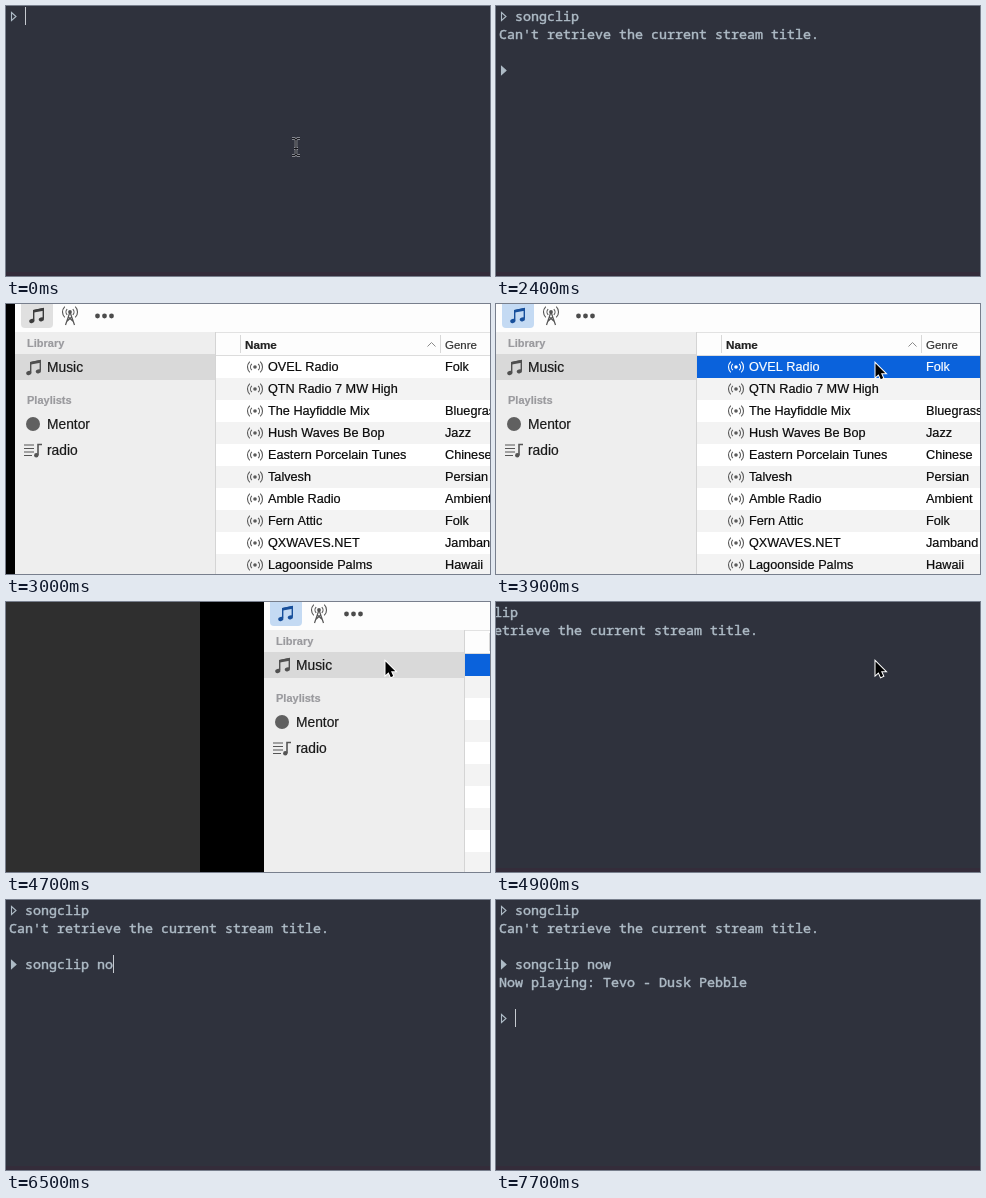
These frames come from a looping animation (484 by 270 pixels, 8 s). An HTML page with a canvas:

```html
<!DOCTYPE html>
<html lang="en">
<head>
<meta charset="utf-8">
<title>songclip demo</title>
<style>
html, body { margin: 0; height: 100%; overflow: hidden; background: #000; }
canvas { display: block; }
</style>
</head>
<body>
<canvas id="stage" width="484" height="270"></canvas>
<script>
const c = document.getElementById('stage').getContext('2d');
const LOOP = 8000, STEP = 100;
const PANE = 720, SCREEN = 1440, TRAVEL = 1504;   // terminal pane, whole space, space + gap
const MONO = '13.333px "Noto Sans Mono", "Liberation Mono", monospace';
const SANS = '"Liberation Sans", Arial, sans-serif';
const INK = '#aebbc6';

const stations = [
  ['OVEL Radio', 'Folk'], ['QTN Radio 7 MW High', ''], ['The Hayfiddle Mix', 'Bluegrass'],
  ['Hush Waves Be Bop', 'Jazz'], ['Eastern Porcelain Tunes', 'Chinese'], ['Talvesh', 'Persian'],
  ['Amble Radio', 'Ambient'], ['Fern Attic', 'Folk'], ['QXWAVES.NET', 'Jamband'],
  ['Lagoonside Palms', 'Hawaii']
];
// [time, characters typed]
const firstKeys = [[600, 1], [700, 3], [800, 5], [900, 6], [1100, 8]];
const secondKeys = [[5600, 3], [5700, 6], [5800, 8], [6300, 9], [6400, 10], [6500, 11], [6600, 12]];

const typed = (keys, t) => keys.reduce((n, [at, count]) => t >= at ? count : n, 0);

// Critically damped slide, 0 to 1
function glide(ms) {
  const x = Math.max(0, ms) * 0.0213;
  return 1 - (1 + x) * Math.exp(-x);
}

function rect(x, y, w, h, color) {
  c.fillStyle = color;
  c.fillRect(x, y, w, h);
}

// A thin outline of the same colour gives the heavier smoothing of the screen text
function text(str, x, y, font, color, weight = 0.2) {
  c.font = font;
  c.fillStyle = c.strokeStyle = color;
  c.lineWidth = weight;
  c.lineJoin = 'round';
  c.fillText(str, x, y);
  c.strokeText(str, x, y);
  c.lineJoin = 'miter';
}

function stroke(path, color, width = 1) {
  c.strokeStyle = color;
  c.lineWidth = width;
  c.stroke(new Path2D(path));
}

function at(x, y, draw) {
  c.save();
  c.translate(x, y);
  draw();
  c.restore();
}

function disc(x, y, r, color) {
  c.fillStyle = color;
  c.beginPath();
  c.arc(x, y, r, 0, 7);
  c.fill();
}

// ---- Terminal ----
const line = (str, col, row) => text(str, 3 + col * 8, 15 + row * 18, MONO, INK, 0.45);

function prompt(row, solid) {
  const y = 10.5 + row * 18;
  const d = `M5.5 ${y - 4} L10 ${y} L5.5 ${y + 4} Z`;
  stroke(d, INK, 1.1);
  if (solid) {
    c.fillStyle = INK;
    c.fill(new Path2D(d));
  }
}

function terminal(t) {
  rect(0, 0, PANE, 270, '#2f323d');
  rect(0, 266, PANE, 4, '#342c3a');
  const one = typed(firstKeys, t), two = typed(secondKeys, t);
  let col = 2 + one, row = 0;

  prompt(0, false);
  line('songclip'.slice(0, one), 2, 0);
  if (t >= 1300) { col = 0; row = 1; }
  if (t >= 1400) {
    line("Can't retrieve the current stream title.", 0, 1);
    row = 2;
  }
  if (t >= 1500) {
    prompt(3, true);
    line('songclip now'.slice(0, two), 2, 3);
    text('~/Downloads', 618, 69, MONO, '#c8c8c8', 0.45);
    col = 2 + two;
    row = 3;
  }
  if (t >= 6900) { col = 0; row = 4; }
  if (t >= 7300) {
    line('Now playing: Tevo - Dusk Pebble', 0, 4);
    row = 5;
  }
  if (t >= 7500) {
    prompt(6, false);
    col = 2;
    row = 6;
  }

  const x = 3 + col * 8, y = 1 + row * 18;
  const off = (t >= 400 && t < 600) || (t >= 2400 && t < 2600);
  if (t >= 2600 && t < 5500) stroke(`M${x + .5} ${y + .5} h7 v17 h-7 Z`, '#b9c0c8');
  else if (!off) rect(x, y, 1, 18, '#c6cad0');

  // Inactive pane fades darker
  if (t >= 2500 && t < 4000) {
    rect(0, 0, PANE, 270, `rgba(0,0,0,${0.52 * Math.min(1, (t - 2500) / 200)})`);
  }
}

// ---- Music player ----
function note(x, y, color) {
  at(x, y, () => {
    stroke('M4.7 12 V2.5 L14.3 .7 V10.5', color, 1.4);
    stroke('M4.7 3.2 L14.3 1.4', color, 2.6);
    c.fillStyle = color;
    for (const [px, py] of [[2.8, 13], [12.4, 11.3]]) {
      c.beginPath();
      c.ellipse(px, py, 2.7, 2, -.3, 0, 7);
      c.fill();
    }
  });
}

function waves(x, y, color, radii) {
  c.strokeStyle = color;
  c.lineWidth = 1.1;
  for (const r of radii) for (const a of [0, Math.PI]) {
    c.beginPath();
    c.arc(x, y, r, a - .8, a + .8);
    c.stroke();
  }
}

function sidebar(active) {
  rect(0, 28, 200, 242, '#eeeeee');
  rect(200, 28, 1, 242, '#d4d4d4');
  rect(0, 50, 200, 26, '#d9d9d9');

  c.fillStyle = active ? '#c4daf3' : '#e0e0e0';
  c.beginPath();
  c.roundRect(6, -6, 32, 30, 4);
  c.fill();
  note(14, 4, active ? '#174f9b' : '#3c3c3c');

  waves(55, 8, '#555', [4, 7.5]);
  disc(55, 8, 1.9, '#555');
  stroke('M55 8 L50.5 21 M55 8 L59.5 21 M53.3 13 L58.3 17.5 M56.7 13 L51.7 17.5', '#555', 1.2);
  for (const x of [82.5, 89.5, 96.5]) disc(x, 12, 2.4, '#4c4c4c');

  const label = 'bold 11px ' + SANS, item = '13.8px ' + SANS;
  text('Library', 12, 43, label, '#9a9a9e');
  text('Playlists', 12, 100, label, '#9a9a9e');
  text('Music', 32, 68, item, '#1a1a1a');
  text('Mentor', 32, 125, item, '#1a1a1a');
  text('radio', 32, 151, item, '#1a1a1a');
  note(11, 56, '#505050');
  disc(18, 120, 7, '#606060');
  at(9, 139, () => {
    stroke('M0 2 H10 M0 5.5 H10 M0 9 H10 M0 12.5 H8', '#555', 1.2);
    stroke('M14 12 V1.5 H18', '#555', 1.6);
    disc(12.3, 12.3, 2.2, '#555');
  });
}

function list(selected) {
  rect(201, 28, 300, 1, '#e2e2e2');
  rect(201, 51, 300, 1, '#dcdcdc');
  rect(225, 31, 1, 18, '#d8d8d8');
  rect(425, 31, 1, 18, '#d8d8d8');
  text('Name', 230, 45, 'bold 11.7px ' + SANS, '#222');
  text('Genre', 430, 45, '11.5px ' + SANS, '#333');
  stroke('M412.5 42.5 L416.5 38.5 L420.5 42.5', '#8a8a8a');
  stations.forEach(([name, genre], i) => {
    const y = 52 + i * 22, lit = selected && i === 0;
    rect(201, y, 300, 22, lit ? '#0a62dc' : i % 2 ? '#f3f3f3' : '#fff');
    const ink = lit ? '#fff' : '#0a0a0a', mark = lit ? '#fff' : '#5a5a5a';
    disc(240, y + 11, 1.8, mark);
    waves(240, y + 11, mark, [4.5, 7.5]);
    text(name, 253, y + 15, '12.7px ' + SANS, ink);
    text(genre, 430, y + 15, '12.7px ' + SANS, ink);
  });
}

function player(t) {
  rect(0, 0, 500, 270, '#fdfdfd');
  list(t >= 3900);
  sidebar(t >= 3400);
}

// ---- Mouse ----
function arrow(x, y) {
  at(x, y, () => {
    const d = 'M.5 .5 V14 L3.6 11.2 L5.8 16.2 L8.2 15.1 L6 10.2 H10.3 Z';
    stroke(d, '#fff', 2);
    c.fillStyle = '#000';
    c.fill(new Path2D(d));
  });
}

function beam(x, y) {
  at(x, y, () => {
    const d = 'M-4 -8.5 H-1.5 L0 -7 L1.5 -8.5 H4 M0 -7 V7 M-4 8.5 H-1.5 L0 7 L1.5 8.5 H4 M-2 1.5 H2';
    stroke(d, '#a2a4aa', 2.6);
    stroke(d, '#15161b', 1.1);
  });
}

function mouse(t) {
  if (t < 600) beam(290, 141);
  else if (t >= 3500 && t < 3600) arrow(359, 72);
  else if (t >= 3600 && t < 5200) arrow(379, 59);
  else if (t >= 5200 && t < 5500) beam(380.5, 61);
}

function draw(t) {
  const shift = Math.round(TRAVEL * (glide(t - 2659.5) - glide(t - 4665)));
  rect(0, 0, 484, 270, '#000');
  at(-shift, 0, () => {
    if (shift < PANE) terminal(t);
    rect(PANE, 0, SCREEN - PANE, 270, '#2f2f2f');
    c.translate(TRAVEL, 0);
    if (shift > TRAVEL - 484) player(t);
  });
  mouse(t);
}

function frame() {
  draw(Math.floor(performance.now() % LOOP / STEP) * STEP);
  requestAnimationFrame(frame);
}
frame();
</script>
</body>
</html>
```
